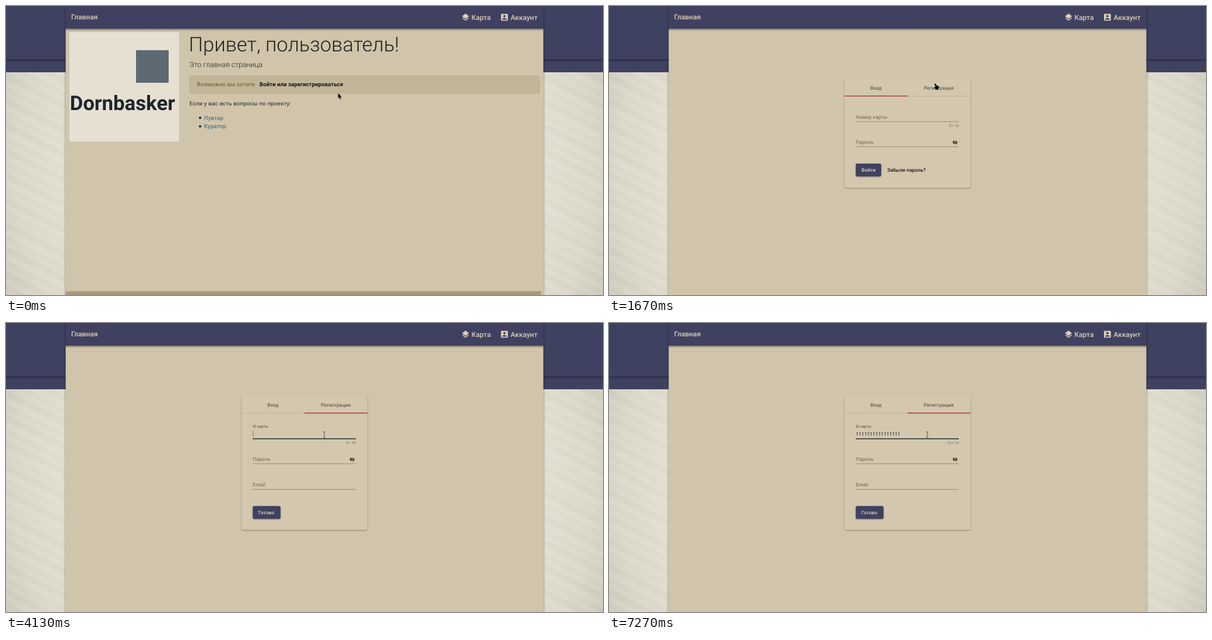
These frames come from a looping animation (1024 px wide and 497 px high, 8 s). An HTML page:

```html
<!DOCTYPE html>
<html lang="ru">
<head>
<meta charset="utf-8">
<title>Регистрация</title>
<style>
  html, body { margin: 0; width: 100%; height: 100%; overflow: hidden; background: #dedaca; }
  svg { display: block; width: 1024px; height: 497px; }
  text { font-family: Roboto, "Noto Sans", sans-serif; text-rendering: geometricPrecision; white-space: pre; }
  .nav { font-size: 12px; font-weight: 500; fill: #d9cfb8; }
  .icon { fill: #d9cfb8; }
  .body { font-size: 9.745px; letter-spacing: .2px; fill: #212322; }
  .link { fill: #2f6284; }
  .label, .strong, .tab, .onbtn, .value { font-size: 8.527px; }
  .label { fill: #6a6354; letter-spacing: .1px; }
  .count { font-size: 6.4px; fill: #6f6858; text-anchor: end; }
  .strong { font-weight: 500; fill: #1b1a18; }
  .tab { font-weight: 500; fill: #665f51; text-anchor: middle; }
  .onbtn { font-weight: 500; fill: #dcd2bc; }
  .line { stroke: #81796a; stroke-width: .8; }
  .btn { fill: #3f4161; filter: url(#lift); }
</style>
</head>
<body>
<svg viewBox="0 0 1024 497">
  <defs>
    <pattern id="stripes" width="60" height="38" patternUnits="userSpaceOnUse" patternTransform="rotate(27)">
      <rect width="60" height="9" fill="#fff" opacity=".1"/>
      <rect y="18" width="60" height="7" fill="#fff" opacity=".08"/>
      <rect y="29" width="60" height="4" fill="#8a8468" opacity=".03"/>
    </pattern>
    <radialGradient id="vignette" gradientUnits="userSpaceOnUse" cx="512" cy="285" r="570">
      <stop offset=".7" stop-color="#e3dfd1"/>
      <stop offset=".87" stop-color="#dad7c8"/>
      <stop offset="1" stop-color="#c9c6b7"/>
    </radialGradient>
    <linearGradient id="fall" x2="0" y2="1">
      <stop stop-color="#000" stop-opacity=".38"/>
      <stop offset="1" stop-color="#000" stop-opacity="0"/>
    </linearGradient>
    <filter id="lift" x="-20%" y="-20%" width="140%" height="150%">
      <feDropShadow dx="0" dy="1" stdDeviation=".8" flood-opacity=".4"/>
    </filter>
    <filter id="side" filterUnits="userSpaceOnUse" x="90" y="-20" width="844" height="540">
      <feDropShadow dx="0" dy="1" stdDeviation="2" flood-opacity=".45"/>
    </filter>
    <clipPath id="pane"><rect x="404" y="156" width="216" height="202"/></clipPath>
    <path id="eye" d="M12 7c2.76 0 5 2.24 5 5 0 .65-.13 1.26-.36 1.83l2.92 2.92c1.51-1.26 2.7-2.89 3.43-4.75-1.73-4.39-6-7.5-11-7.5-1.4 0-2.74.25-3.98.7l2.16 2.16C10.74 7.13 11.35 7 12 7zM2 4.27l2.74 2.74C3.08 8.3 1.78 10.02 1 12c1.73 4.39 6 7.5 11 7.5 1.55 0 3.03-.3 4.38-.84l.42.42L19.73 22 21 20.73 3.27 3 2 4.27zM7.53 9.8l1.55 1.55c-.05.21-.08.43-.08.65 0 1.66 1.34 3 3 3 .22 0 .44-.03.65-.08l1.55 1.55c-.67.33-1.41.53-2.2.53-2.76 0-5-2.24-5-5 0-.79.2-1.53.53-2.2z"/>
    <g id="secret">
      <text class="label" x="423.3" y="237.4">Пароль</text>
      <use href="#eye" transform="translate(589.2 230.1) scale(.375)" fill="#1b1a18"/>
      <path class="line" d="M423.3 242h176.7"/>
    </g>
  </defs>

  <rect width="1024" height="497" fill="url(#vignette)"/>
  <rect y="114" width="1024" height="383" fill="url(#stripes)"/>
  <rect width="1024" height="114" fill="#3f4161"/>
  <rect y="92" width="1024" height="4" fill="url(#fall)"/>

  <g filter="url(#side)">
    <rect x="102.4" y="39" width="819.2" height="470" fill="#d0c4aa"/>
    <rect x="102.4" y="-10" width="819.2" height="49" fill="#3f4161"/>
  </g>
  <rect x="102.4" y="39" width="819.2" height="4" fill="url(#fall)"/>
  <text class="nav" x="111.8" y="23.4">Главная</text>
  <path class="icon" transform="translate(780.3 11.6) scale(.66)" d="M11.99 18.54l-7.37-5.73L3 14.07l9 7 9-7-1.63-1.27-7.38 5.74zM12 16l7.36-5.73L21 9l-9-7-9 7 1.63 1.27L12 16z"/>
  <text class="nav" x="798.3" y="23.8">Карта</text>
  <path class="icon" transform="translate(847 11.5) scale(.66)" d="M3 5v14c0 1.1.89 2 2 2h14c1.1 0 2-.9 2-2V5c0-1.1-.9-2-2-2H5c-1.11 0-2 .9-2 2zm12 4c0 1.66-1.34 3-3 3s-3-1.34-3-3 1.34-3 3-3 3 1.34 3 3zm-9 8c0-2 4-3.1 6-3.1s6 1.1 6 3.1v1H6v-1z"/>
  <text class="nav" x="865.6" y="23.8">Аккаунт</text>

  <g id="home">
    <rect x="108.8" y="44.8" width="188" height="188.4" rx="2" fill="#e6e0d3"/>
    <rect x="223" y="76" width="56" height="56" fill="#5d6a74"/>
    <text x="109.5" y="179.3" font-size="34.8" font-weight="700" fill="#1e242c">Dornbasker</text>
    <text x="313.6" y="78" font-size="34.5" font-weight="300" fill="#1f2123">Привет, пользователь!</text>
    <text x="314.6" y="104.5" font-size="12.3" font-weight="300" fill="#1f2123">Это главная страница</text>
    <rect x="314.9" y="120.1" width="600.2" height="30.2" rx="2" fill="#c2b699" stroke="#b9ad90" stroke-width=".8"/>
    <text class="body" x="327.6" y="138.2" style="fill:#69572b">Возможно вы хотите</text>
    <rect id="ring" x="434.6" y="128.6" width="143" height="12.4" fill="#000" fill-opacity=".18" stroke="#4a4639" stroke-width=".8" stroke-dasharray="1 1"/>
    <text x="434.8" y="138.2" font-size="9.745" font-weight="700" fill="#151617">Войти или зарегистрироваться</text>
    <path id="under" d="M435 139.6h142.6" stroke="#151617" stroke-width=".8"/>
    <text class="body" x="314.6" y="170.8">Если у вас есть вопросы по проекту:</text>
    <circle cx="333" cy="192.3" r="2.1" fill="#212322"/>
    <circle cx="333" cy="207" r="2.1" fill="#212322"/>
    <text class="body link" x="339.6" y="195.6">Лувтар</text>
    <text class="body link" x="339.6" y="210.2">Куратор</text>
    <rect x="102.4" y="490.6" width="815.4" height="7" fill="#a6997c"/>
  </g>

  <g id="card">
    <rect id="panel" x="404.2" y="126" width="215.6" height="186.5" rx="3" fill="#d3c7ae" filter="url(#lift)"/>
    <path d="M404.2 155.3h215.6" stroke="#bdb199" stroke-width=".8"/>
    <rect id="ink" x="404.2" y="154" width="107.8" height="1.5" fill="#ad3c4c"/>
    <text class="tab" x="458" y="143.6">Вход</text>
    <text id="regTab" class="tab" x="565.6" y="143.6">Регистрация</text>
    <g clip-path="url(#pane)">
      <g id="login">
        <text class="label" x="423.3" y="193.7">Номер карты</text>
        <path class="line" d="M423.3 198.9h176.7"/>
        <text class="count" x="600" y="208.4">0 / 16</text>
        <use href="#secret"/>
        <rect class="btn" x="423.3" y="271" width="43.6" height="22" rx="2.4"/>
        <text class="onbtn" x="433" y="284.9">Войти</text>
        <text class="strong" x="477" y="284.9">Забыли пароль?</text>
      </g>
      <g id="signup">
        <text id="idLabel" class="label">ID карты</text>
        <path class="line" d="M423.3 198.9h176.7"/>
        <path id="focus" d="M-88.35 0h176.7" stroke="#33363c" stroke-width="1.5"/>
        <text id="digits" class="value" x="423.3" y="193.7" fill="#232321"></text>
        <path id="caret" d="M0 185.6v10" stroke="#5d584c" stroke-width=".8"/>
        <text id="count" class="count" x="600" y="208.4"></text>
        <use href="#secret"/>
        <text class="label" x="423.3" y="281.2">Email</text>
        <path class="line" d="M423.3 286.2h176.7"/>
        <rect class="btn" x="423.3" y="314.8" width="47.6" height="22" rx="2.4"/>
        <text class="onbtn" x="432.8" y="328.7">Готово</text>
      </g>
    </g>
  </g>

  <g id="status">
    <path d="M0 482.8h106q3 0 3 3v12H0z" fill="#94918a"/>
    <text x="2" y="494.2" font-size="9.2" fill="#dcd9d1">localhost:4200/auth/login</text>
  </g>

  <path id="arrow" d="M0 0v8.800l2-1.900 1.600 3.500 1.500-.7-1.500-3.400h2.800z" fill="#0b0b0b"/>
  <path id="hand" d="M.2 .3q.9-.7 1.700.4l1.500 2.700 2.900.9q1.400.5 1.200 1.900l-.5 2.700-1 1.800H2.700L-.1 7.500q-.8-1.200.4-1.500l1.300.4L0 1.600q-.3-.9.2-1.300z" fill="#0b0b0b"/>
  <path id="beam" d="M-2-5h1.400l.6.5.6-.5H2M-2 5h1.400l.6-.5.6.5H2M0-4.500v9" fill="none" stroke="#4b473d" stroke-width=".9"/>
</svg>
<script>
const LOOP = 8000, TICK = 1000 / 15, DIGIT = 4.79;
const el = {};
document.querySelectorAll('svg [id]').forEach(n => el[n.id] = n);

// key rows: [ms, value, value, ...]
const pointer = [[0, 569.6, 150], [200, 568, 146], [470, 562, 138], [670, 558.4, 133.2],
  [2470, 558.4, 133.2], [2670, 552, 160], [2870, 547.6, 176], [3000, 547, 182], [3200, 546, 192.2]];
const slide = [[2000, 0], [2270, .73], [2470, .73], [2600, 1]];
const bubble = [[330, 0], [530, 1], [1200, 1], [1470, 0]];
const float = [[3600, 0], [4000, 1]];
const grow = [[3600, 0], [3930, 1]];
const typed = [[0, 0], [4730, 1], [5070, 2], [5530, 4]];
const erased = [[6670, 18], [6870, 17], [7070, 16]];

const smooth = k => k * k * (3 - 2 * k);

function mix(rows, t) {
  if (t <= rows[0][0]) return rows[0].slice(1);
  for (let i = 1; i < rows.length; i++) {
    const a = rows[i - 1], b = rows[i];
    if (t < b[0]) {
      const k = (t - a[0]) / (b[0] - a[0]);
      return a.slice(1).map((v, j) => v + (b[j + 1] - v) * k);
    }
  }
  return rows[rows.length - 1].slice(1);
}

const hold = (rows, t) => rows.filter(r => r[0] <= t).pop()[1];

function digitCount(t) {
  if (t < 5530) return hold(typed, t);
  if (t < 6670) return Math.min(19, 4 + Math.floor((t - 5530) * 15 / 800 + .01));
  return hold(erased, t);
}

const show = (node, on) => node.setAttribute('visibility', on ? 'visible' : 'hidden');
const move = (node, x, y, s = 1) => node.setAttribute('transform', `translate(${x} ${y}) scale(${s})`);

function draw(now) {
  const t = Math.round(Math.floor((now % LOOP + 5) / TICK) * TICK / 10) * 10;
  const atHome = t < 1130;

  el.home.style.display = atHome ? '' : 'none';
  el.card.style.display = atHome ? 'none' : '';
  show(el.under, t >= 330);
  show(el.ring, t >= 870);
  el.status.setAttribute('opacity', mix(bubble, t)[0]);

  const p = mix(slide, t)[0];
  move(el.login, -216 * p, 0);
  move(el.signup, 216 * (1 - p), 0);
  show(el.login, p < 1);
  show(el.signup, p > 0);
  el.panel.setAttribute('height', 186.5 + 43.3 * p);
  el.ink.setAttribute('x', 404.2 + 107.8 * p);
  el.regTab.style.fill = t >= 2070 && t < 3670 ? '#1b1a18' : '';

  const f = smooth(mix(float, t)[0]);
  move(el.idLabel, 423.3, 193.7 - 13.3 * f, 1 - .25 * f);
  el.idLabel.style.fill = t >= 3670 ? '#45433c' : '';
  const g = smooth(mix(grow, t)[0]);
  el.focus.setAttribute('transform', `translate(511.65 199.2) scale(${g} 1)`);
  el.focus.style.display = g ? '' : 'none';

  const n = digitCount(t);
  el.digits.textContent = '1'.repeat(n);
  el.count.textContent = `${n} / 16`;
  move(el.caret, 423.8 + n * DIGIT, 0);
  el.caret.style.display = (t >= 3670 && t < 4470) || (t >= 4730 && t < 7270) ? '' : 'none';

  const [x, y] = mix(pointer, t);
  const kind = t < 330 ? 'arrow' : t < 2530 ? 'hand' : t < 3070 ? 'arrow' : 'beam';
  for (const name of ['arrow', 'hand', 'beam']) {
    show(el[name], name === kind);
    move(el[name], x, y);
  }
}

const start = performance.now();
function loop() {
  draw(performance.now() - start);
  requestAnimationFrame(loop);
}
loop();
</script>
</body>
</html>
```
